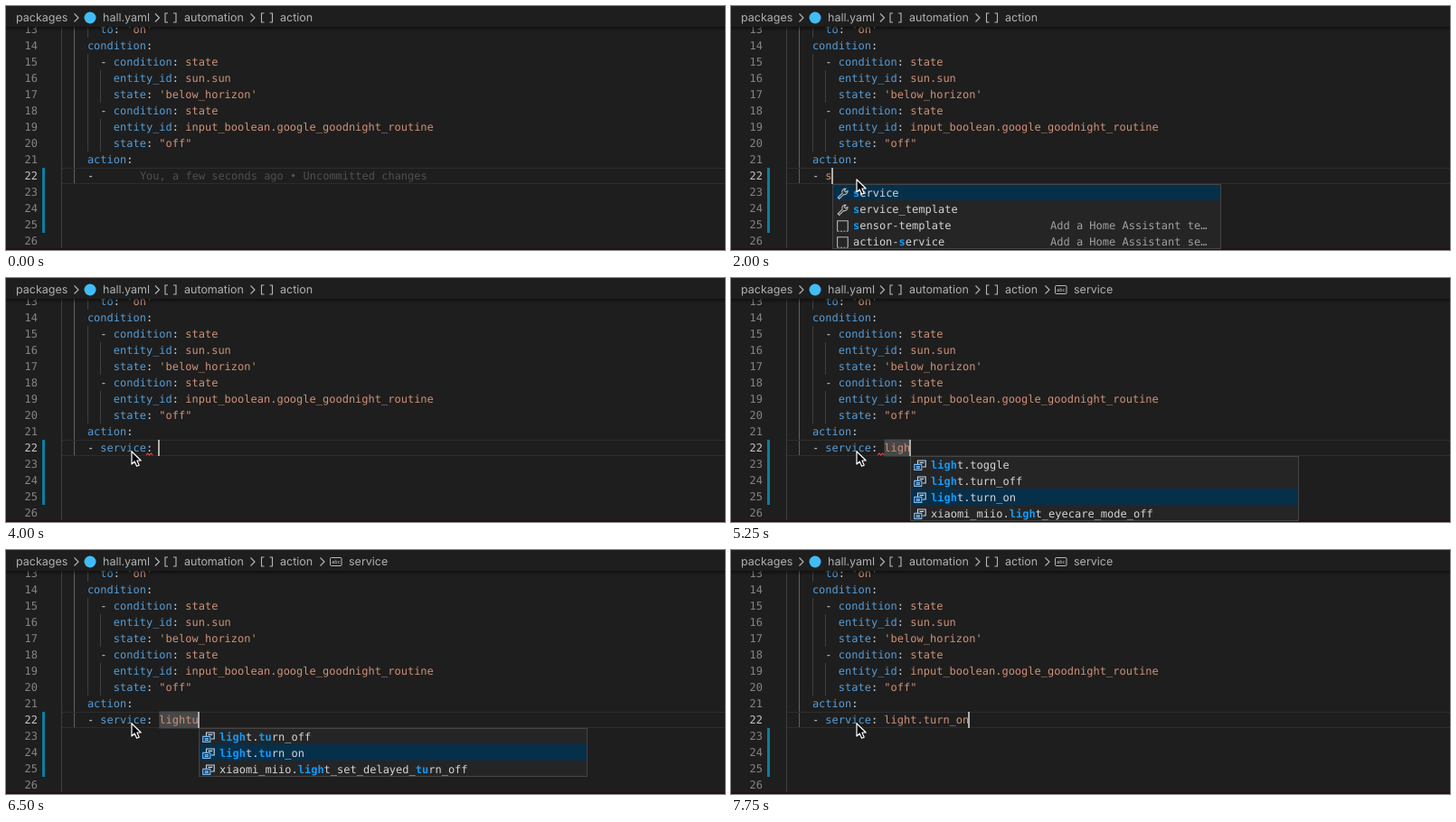
Recreate the animation shown at these times as an HTML page. Size 795 px wide and 270 px high, loop 8000 ms.

```html
<!DOCTYPE html>
<html lang="en">
<head>
<meta charset="utf-8">
<title>YAML editor autocomplete</title>
<style>
  html, body { margin: 0; width: 100%; height: 100%; overflow: hidden; background: #1e1e1e; }
  svg { display: block; width: 795px; height: 270px; }
  text {
    font: 12px "DejaVu Sans Mono", monospace;
    white-space: pre; text-rendering: geometricPrecision; fill: #d4d4d4;
  }
  .crumb { font: 12.5px Inter, sans-serif; fill: #b0b0b0; }
  .num { fill: #858585; text-anchor: end; }
  .now { fill: #c6c6c6; }
  .key { fill: #569cd6; }
  .str { fill: #ce9178; }
  .blame { fill: #505050; }
  .detail { fill: #a0a0a0; }
  .hit { fill: #0f9bf8; font-weight: bold; }
  .icon { fill: none; stroke: #b8b8b8; stroke-width: 1.1; }
</style>
</head>
<body>
<svg id="stage" viewBox="0 0 795 270"></svg>
<script>
const LOOP = 8000, LEFT = 61, CHAR = 12 * 0.602, ROW = 18;
const stage = document.getElementById('stage');

const col = n => LEFT + n * CHAR;
const lineTop = n => 179 + (n - 22) * ROW;
const rect = (x, y, w, h, fill, more = '') =>
  `<rect x="${x}" y="${y}" width="${w}" height="${h}" fill="${fill}" ${more}/>`;
const text = (x, y, body, cls = '') => `<text x="${x}" y="${y}" class="${cls}">${body}</text>`;
const span = (cls, s) => `<tspan class="${cls}">${s}</tspan>`;
const path = (d, cls = 'icon', more = '') => `<path d="${d}" class="${cls}" ${more}/>`;
const at = (x, y, body) => `<g transform="translate(${x} ${y})">${body}</g>`;
const pair = (key, value = '') => span('key', key) + ':' + (value && ' ' + span('str', value));

// line number, indent, content
const code = [
  [13, 6, pair('to', "'on'")],
  [14, 4, pair('condition')],
  [15, 6, '- ' + pair('condition', 'state')],
  [16, 8, pair('entity_id', 'sun.sun')],
  [17, 8, pair('state', "'below_horizon'")],
  [18, 6, '- ' + pair('condition', 'state')],
  [19, 8, pair('entity_id', 'input_boolean.google_goodnight_routine')],
  [20, 8, pair('state', '"off"')],
  [21, 4, pair('action')],
  [22, 4, '-']
];

const icons = {
  wrench: path('M1.2 11 L6.2 6 A3.4 3.4 0 0 1 10 1.2 L8.3 3.4 L9.8 5 L12 3.4 A3.4 3.4 0 0 1 7.6 7.4 L2.7 12.4 Z'),
  snippet: path('M.6 12 V.8 H12.2 V12') + path('M.6 12.2 H12.4', 'icon', 'stroke-dasharray="2 1.4"'),
  value: path('M4.5 5 V1 H13.2 V8 H9.5 M6.5 3.4 H11.2', 'icon', 'style="stroke:#c5d9ea"') +
    path('M.7 5.4 H8.8 V11.4 H.7 Z M2.6 7.6 H7 M2.6 9.4 H7', 'icon', 'style="stroke:#75beff"')
};

const keywords = [
  ['service', 'wrench'], ['service_template', 'wrench'],
  ['sensor-template', 'snippet', 'Add a Home Assistant te…'],
  ['action-service', 'snippet', 'Add a Home Assistant se…']
];
const [toggle, off, on, eyecare, delayed] = [
  'light.toggle', 'light.turn_off', 'light.turn_on',
  'xiaomi_miio.light_eyecare_mode_off', 'xiaomi_miio.light_set_delayed_turn_off'
].map(name => [name, 'value']);
const lights = [toggle, off, on, eyecare], turns = [off, on, delayed];

// Each step changes only the listed properties.
const steps = [
  [0, { caret: 0, typed: '', blame: 1, bar: 22 }],
  [500, { mouse: [228, 96] }],
  [750, { mouse: [150, 174] }],
  [1000, { mouse: [138, 191] }],
  [1250, { caret: 1 }],
  [1750, { caret: 0 }],
  [2000, { caret: 1, blame: 0, typed: 's', list: keywords, hits: ['s'], pick: 0 }],
  [2250, { typed: 'ser', hits: ['se', 'r'] }],
  [2750, { caret: 0 }],
  [3000, { caret: 1, key: 1, list: 0, typed: '' }],
  [3500, { caret: 0, error: 13 }],
  [4000, { caret: 1 }],
  [4500, { typed: 'li', error: 14, word: 1 }],
  [4750, { typed: 'lig' }],
  [5000, { typed: 'ligh' }],
  [5250, { crumb: 1, list: lights, hits: ['ligh'], pick: 2 }],
  [5500, { caret: 0 }],
  [6000, { caret: 1 }],
  [6250, { typed: 'light', error: 0, hits: ['light'] }],
  [6500, { typed: 'lightu', list: turns, hits: ['ligh', 'tu'], pick: 1 }],
  [6750, { typed: 'lighturn', hits: ['ligh', 'turn'] }],
  [7000, { typed: 'lighturnon', list: [on], hits: ['ligh', 'turn', 'on'], pick: 0 }],
  [7500, { typed: 'light.turn_on', list: 0, word: 0 }],
  [7750, { bar: 23 }]
];
let last = {};
const states = steps.map(([time, change]) => ({ time, ...(last = { ...last, ...change }) }));

function mark(label, hits) {
  let out = '', pos = 0;
  for (const hit of hits) {
    const i = label.indexOf(hit, pos);
    if (i < 0) continue;
    out += label.slice(pos, i) + span('hit', hit);
    pos = i + hit.length;
  }
  return out + label.slice(pos);
}

function popup(x, { list, hits, pick }) {
  const h = list.length * ROW;
  let out = rect(x, 197, 430, h, '#252526') + rect(x, 197 + pick * ROW, 430, ROW, '#062f4a');
  list.forEach(([label, icon, detail], i) => {
    const y = 197 + i * ROW;
    out += at(x + (icon === 'value' ? 4 : 5), y + 4, icons[icon]) + text(x + 23, y + 14, mark(label, hits));
    if (detail) out += text(x + 241, y + 14, detail, 'detail');
  });
  return out + rect(x + .5, 197.5, 429, h - 1, 'none', 'stroke="#454545"');
}

const chevron = x => path(`M${x - 2.5} 8.5 l4.5 4.5 l-4.5 4.5`);
const brackets = x => path(`M${x + 3.5} 8 h-3 v10 h3 M${x + 9.5} 8 h3 v10 h-3`);
const crumb = (x, s) => text(x, 17, s, 'crumb');

function editor() {
  let out = rect(0, 0, 795, 270, '#1e1e1e');
  const guide = (n, from, to, color = '#404040') =>
    rect(Math.round(col(n)), lineTop(from), 1, (to - from + 1) * ROW, color);
  out += guide(0, 13, 26) + guide(2, 13, 22, '#606060') + guide(4, 13, 13) + guide(4, 15, 20) +
    guide(6, 16, 17) + guide(6, 19, 20);
  out += rect(62, 179, 733, 1, '#2d2d2d') + rect(62, 196, 733, 1, '#2d2d2d');
  for (let n = 13; n <= 26; n++) out += text(35, lineTop(n) + 13, n, n === 22 ? 'num now' : 'num');
  for (const [n, indent, body] of code) out += text(col(indent), lineTop(n) + 13, body);
  return out;
}

function header() {
  return `<linearGradient id="shade" x2="0" y2="1"><stop stop-color="#000" stop-opacity=".5"/>
    <stop offset="1" stop-color="#000" stop-opacity="0"/></linearGradient>` +
    rect(0, 23, 795, 5, 'url(#shade)') + rect(0, 0, 795, 23, '#1e1e1e') +
    crumb(11, 'packages') + chevron(78) + '<circle cx="93" cy="13" r="6.5" fill="#41bdf5"/>' +
    crumb(107, 'hall.yaml') + chevron(167.5) + brackets(175.5) +
    crumb(197, 'automation') + chevron(273) + brackets(282) + crumb(303, 'action') +
    rect(0, 268, 795, 2, '#21101c');
}

function draw(s) {
  const start = s.key ? 15 : 6, end = start + s.typed.length;
  let out = rect(40, lineTop(s.bar), 3, 251 - lineTop(s.bar), '#0c7d9d');
  if (s.word) out += rect(col(15), 178.5, s.typed.length * CHAR, 19, '#474747');
  if (s.key) out += text(col(6), 192, pair('service'));
  if (s.blame) out += text(col(12) + .2, 192, 'You, a few seconds ago • Uncommitted changes', 'blame');
  out += text(col(start), 192, s.typed, 'str');
  if (s.error) {
    out += path(`M${col(s.error)} 196 l1.8 -2 l1.8 2 l1.8 -2 l1.8 2`, '', 'fill="none" stroke="#f14c4c" stroke-width="1.1"');
  }
  if (s.list) out += popup(Math.round(col(end)), s);
  if (s.caret) out += rect(Math.round(col(end) - 1), 179, 2, 18, '#aeafad');
  if (s.crumb) {
    out += chevron(350) + rect(358.5, 8.5, 12.5, 9, 'none', 'stroke="#b8b8b8" rx="1"') +
      '<text x="360" y="15" style="font-size:5.5px;fill:#c8c8c8">abc</text>' + crumb(379, 'service');
  }
  if (s.mouse) {
    out += at(...s.mouse, path('M1 1 V15 L4.2 12 L6.6 17.3 L9.2 16.2 L6.9 11 H11.2 Z', '',
      'fill="#000" stroke="#fff" stroke-width="1.2" stroke-linejoin="round"'));
  }
  return out;
}

stage.innerHTML = editor() + header() + '<g id="live"></g>';
const live = document.getElementById('live');
const began = performance.now();
let shown;

function tick() {
  const t = (performance.now() - began) % LOOP;
  const state = states.findLast(s => s.time <= t);
  if (state !== shown) live.innerHTML = draw(shown = state);
  requestAnimationFrame(tick);
}
tick();
</script>
</body>
</html>
```
